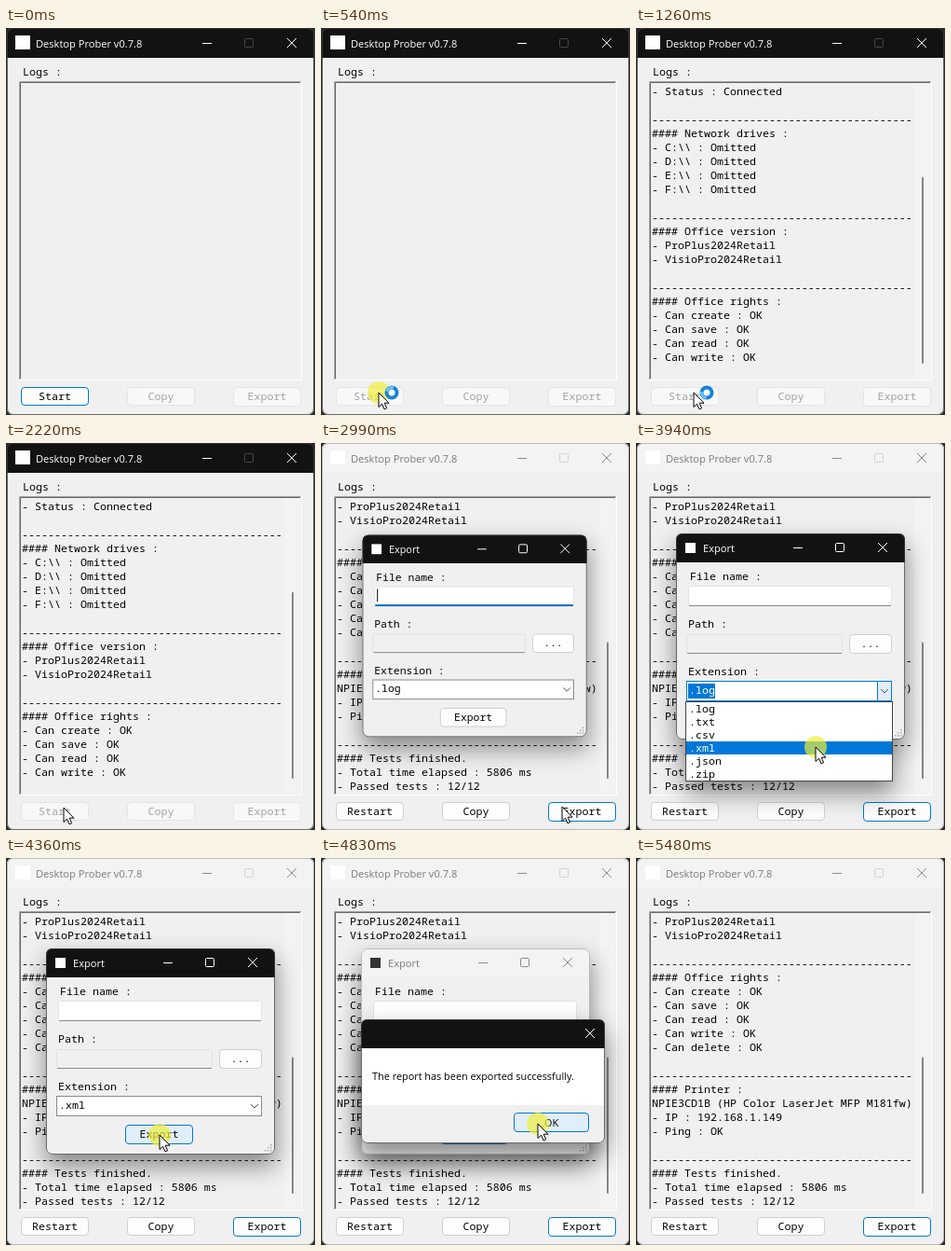
Animation, 332 px wide and 415 px high, one loop 5530 ms. Source, as an HTML page:

```html
<!DOCTYPE html>
<html lang="en">
<head>
<meta charset="utf-8">
<title>Log window</title>
<style>
html, body { margin: 0; width: 100%; height: 100%; overflow: hidden; background: #2a2a2a; }
svg { display: block; }
text { white-space: pre; }
.mono { font: 11.667px "Noto Sans Mono", "DejaVu Sans Mono", monospace; fill: #000; }
.ui { font: 11.1px "Open Sans", "Noto Sans", sans-serif; }
.note { font-size: 10.9px; font-weight: 500; }
.mid { text-anchor: middle; }
.win .bar { fill: #121212; }
.win .cap { fill: #fff; }
.win .ico { stroke: #fff; fill: none; }
.win .dim { stroke: #484848; fill: none; }
.win .mark { fill: #fff; }
.win .edge { fill: none; stroke: #3c3c3c; stroke-opacity: .75; }
.idle .bar { fill: #f3f3f3; }
.idle .cap { fill: #7b7b7b; }
.idle .ico { stroke: #8a8a8a; }
.idle .dim { stroke: #d2d2d2; }
.idle .edge { stroke: #a8a8a8; }
#dlg.idle .mark { fill: #333; }
.btn rect { fill: #fdfdfd; stroke: #d0d0d0; }
.btn.off rect { fill: #f8f8f8; stroke: #e4e4e4; }
.btn.off text { fill: #a3a3a3; }
.btn.focus rect { stroke: #0078d4; }
.btn.hot rect { fill: #e0eef9; }
.pop { filter: drop-shadow(0 12px 13px rgba(0,0,0,.45)); }
</style>
</head>
<body>
<svg id="stage" width="332" height="415" viewBox="0 0 332 415"></svg>
<script>
const LOOP = 5530;
const DASH = "-".repeat(40);
const block = (title, ...items) => [DASH, "#### " + title, ...items, ""];
const LOG = [
  ...block("Tests started."),
  ...block("Internet :", "- Ping : OK"),
  ...block("VPN :", "- Status : Connected"),
  ...block("Network drives :", ...["C", "D", "E", "F"].map(d => `- ${d}:\\\\ : Omitted`)),
  ...block("Office version :", "- ProPlus2024Retail", "- VisioPro2024Retail"),
  ...block("Office rights :", ...["create", "save", "read", "write", "delete"].map(r => `- Can ${r} : OK`)),
  ...block("Printer :", "NPIE3CD1B (HP Color LaserJet MFP M181fw)", "- IP : 192.168.1.149", "- Ping : OK"),
  DASH, "#### Tests finished.", "- Total time elapsed : 5806 ms", "- Passed tests : 12/12"
];
const ROWS = 21;
const TYPES = [".log", ".txt", ".csv", ".xml", ".json", ".zip"];

// [time, lines written]
const PROGRESS = [[0, 0], [560, 3], [660, 6], [780, 10], [900, 17], [1020, 22], [1140, 25], [1220, 29],
  [2280, 30], [2340, 36], [2400, LOG.length]];
// [time, x, y]
const PATH = [[120, 150, 420], [440, 62, 391], [2440, 62, 391], [2740, 259, 390], [3080, 259, 390],
  [3420, 267, 266], [3560, 267, 266], [3860, 193, 326], [4020, 193, 326], [4260, 165, 297],
  [4480, 165, 297], [4740, 233, 285], [4960, 233, 285], [5300, 345, 330]];
const CLICKS = [[480, 560], [2800, 2900], [3460, 3540], [3880, 3990], [4300, 4400], [4790, 4890]];
const RUN = [520, 2400], BUSY = [540, 1800], DIALOG = [2900, 4990], LIST = [3500, 3990], ALERT = [4460, 4900];

const rect = (x, y, w, h, attrs = "") => `<rect x="${x}" y="${y}" width="${w}" height="${h}" ${attrs}/>`;
const text = (x, y, s, cls = "mono", attrs = "") => `<text x="${x}" y="${y}" class="${cls}" ${attrs}>${s}</text>`;
const path = (d, attrs = "") => `<path d="${d}" ${attrs}/>`;
const button = (id, x, y, w, h, label, base, cls = "mono") =>
  `<g id="${id}" class="btn">${rect(x + .5, y + .5, w - 1, h - 1, 'rx="3.5"')}${text(x + w / 2, base, label, cls + " mid")}</g>`;
const cross = (x, y) => path(`M${x} ${y}l10 10m0 -10l-10 10`, 'class="ico"');
const frame = (x, y, w, h, bar) => {
  const top = `M${x} ${y + bar}v${7 - bar}q0-7 7-7h${w - 14}q7 0 7 7v${bar - 7}z`;
  return rect(x, y, w, h, 'rx="7" fill="#f0f0f0"') + path(top, 'class="bar"') +
    rect(x + .5, y + .5, w - 1, h - 1, 'rx="6.5" class="edge"');
};
const field = (x, y, w, h, fill, id) =>
  rect(x + .5, y + .5, w - 1, h - 1, `rx="2" fill="${fill}" stroke="#e2e2e2"`) +
  rect(x + 1, y + h - 1, w - 2, 1, `id="${id}" fill="#8a8a8a"`);

const mainWindow = `<g id="main" class="win">
  ${frame(1, 0, 330, 415, 32)}
  ${rect(10, 8, 16, 15, 'class="mark"')}
  ${text(32, 21, "Desktop Prober v0.7.8", "ui cap")}
  ${path("M211 16.5h10", 'class="ico"')}${rect(256.5, 11.5, 9, 9, 'rx="1" class="dim"')}${cross(302, 11)}
  ${text(18, 51, "Logs :")}
  ${path("M14.5 377V57.5H317", 'fill="none" stroke="#a0a0a0"')}
  ${path("M15.5 376V58.5H316", 'fill="none" stroke="#696969"')}
  ${path("M14 377.5H317.5V57", 'fill="none" stroke="#fff"')}
  <svg x="16" y="59" width="300" height="317"><g id="log">${LOG.map((s, i) => text(1, 13 + i * 15, s)).join("")}</g></svg>
  <g id="scroll">${rect(299, 59, 17, 317, 'fill="#f3f3f3"')}${rect(307, 74, 2, 286, 'id="thumb" rx="1" fill="#868686"')}</g>
  ${button("start", 16, 385, 73, 20, "Start", 398.5)}
  ${button("copy", 130, 385, 73, 20, "Copy", 399)}
  ${button("export", 244, 385, 73, 21, "Export", 399)}
</g>`;

const grip = [[0, 0], [0, 1], [1, 1], [0, 2], [1, 2], [2, 2]]
  .map(([c, r]) => rect(284 - c * 3, 307 + r * 3, 1.5, 1.5, 'fill="#aaa"')).join("");

const dialog = `<g id="dlg" class="win pop">
  ${frame(43, 97, 246, 221, 31)}
  ${rect(53, 107, 11, 11, 'class="mark"')}
  ${text(72, 117, "Export", "ui cap")}
  ${path("M169 112.5h10", 'class="ico"')}${rect(214.5, 107.5, 9, 9, 'rx="1" class="ico"')}${cross(260, 107)}
  ${text(58, 147, "File name :")}
  ${field(56, 153, 219, 22, "#fff", "nameLine")}
  ${rect(59, 156, 1, 14, 'id="caret"')}
  ${text(56, 198, "Path :")}
  ${field(54, 205, 168, 21, "#f0f0f0", "pathLine")}
  ${button("browse", 229, 205, 46, 21, "...", 219)}
  ${text(56, 249, "Extension :")}
  ${rect(54.5, 255.5, 220, 21, 'id="combo" fill="#fff" stroke="#8a8a8a"')}
  ${rect(259.5, 255.5, 15, 21, 'id="drop" fill="#e0eef9" stroke="#0078d4"')}
  ${path("M263 264l4 4 4-4", 'fill="none" stroke="#555"')}
  ${rect(56, 258, 29, 16, 'id="sel" fill="#0078d7"')}
  ${text(57, 269, ".log", "mono", 'id="ext"')}
  ${button("save", 128, 286, 73, 21, "Export", 300)}
  ${grip}
  <g id="list">
    ${rect(53.5, 277.5, 222, 85, 'fill="#fff" stroke="#444"')}
    ${rect(54, 278, 221, 14, 'id="row" fill="#0078d7"')}
    ${TYPES.map((s, i) => text(57, 289 + i * 14, s, "mono item")).join("")}
  </g>
</g>`;

const alertBox = `<g id="alert" class="win pop">
  ${frame(43, 173, 262, 133, 31)}
  ${rect(44, 204, 260, 61, 'fill="#fff"')}
  ${cross(284, 183)}
  ${text(55, 238, "The report has been exported successfully.", "ui note")}
  ${button("ok", 207, 273, 81, 21, "OK", 288, "ui")}
</g>`;

const pointer = `<g id="pointer">
  <circle id="halo" r="12" fill="#f0ee3c" fill-opacity=".7"/>
  ${path("M0 0V15.5L3.6 12.2 6 17.8 8.6 16.7 6.2 11.2H11z", 'fill="#fff" stroke="#000" stroke-linejoin="round"')}
  <g id="ring" transform="translate(14 0)"><circle r="5.5" fill="#fff" stroke="#1583dc" stroke-width="4"/>
    <circle id="spin" r="5.5" fill="none" stroke="#6fc3f7" stroke-width="3" stroke-dasharray="9 25.6"/></g>
</g>`;

const backdrop = rect(0, 0, 332, 415, 'fill="#2a2a2a"');

document.getElementById("stage").innerHTML = backdrop + mainWindow + dialog + alertBox + pointer;

const $ = id => document.getElementById(id);
const within = (t, [a, b]) => t >= a && t < b;
const show = (id, on) => $(id).style.display = on ? "" : "none";
const put = (id, attrs) => Object.entries(attrs).forEach(([k, v]) => $(id).setAttribute(k, v));
const toggle = (id, cls, on) => $(id).classList.toggle(cls, on);
const label = (id, s) => { const n = $(id).querySelector("text"); if (n.textContent !== s) n.textContent = s; };
const clamp = v => Math.max(0, Math.min(1, v));
const lines = [...$("log").children], items = [...document.querySelectorAll(".item")];

function pointerAt(t) {
  let i = PATH.findIndex(k => k[0] > t);
  if (i < 1) i = i ? PATH.length - 1 : 1;
  const [a, b] = [PATH[i - 1], PATH[i]];
  const p = clamp((t - a[0]) / (b[0] - a[0])), e = p * p * (3 - 2 * p);
  return [a[1] + (b[1] - a[1]) * e, a[2] + (b[2] - a[2]) * e];
}

// Windows grow in on opening and fade out on closing.
function popup(id, t, [from, to], cx, cy) {
  const p = clamp((t - from) / 216), out = clamp((t - to) / 100);
  const s = (.9 + .1 * (1 - (1 - p) ** 3)) * (1 - .08 * out);
  show(id, t >= from && out < 1);
  put(id, {
    transform: `translate(${cx} ${cy}) scale(${s}) translate(${-cx} ${-cy})`,
    opacity: Math.min(1, p * 3) * (1 - out)
  });
}

function drawLog(t) {
  const n = PROGRESS.filter(k => k[0] <= t).pop()[1];
  const total = Math.min(n + 1, LOG.length), top = Math.max(0, total - ROWS);
  lines.forEach((el, i) => el.style.display = i < n ? "" : "none");
  put("log", { transform: `translate(0 ${-15 * top})` });
  show("scroll", top > 0);
  const len = 286 * ROWS / Math.max(total, ROWS);
  put("thumb", { y: 360 - len, height: len });
}

function drawButtons(t, x, y) {
  const running = within(t, RUN), done = t >= RUN[1];
  label("start", done ? "Restart" : "Start");
  toggle("start", "off", running);
  toggle("start", "focus", t < RUN[0]);
  toggle("copy", "off", !done);
  toggle("export", "off", !done);
  toggle("export", "focus", t >= 2700);
  toggle("export", "hot", done && t < DIALOG[0] && x > 244 && y > 384);
  toggle("save", "focus", t >= 4300);
  toggle("save", "hot", within(t, [4220, 4460]));
  toggle("ok", "focus", true);
  toggle("ok", "hot", x > 207 && y < 295);
}

function drawDialog(t, y) {
  const open = within(t, LIST), typing = t < 3460, picked = t >= LIST[1];
  popup("dlg", t, DIALOG, 120, 180);
  toggle("dlg", "idle", within(t, ALERT));
  put("nameLine", { fill: typing ? "#0067c0" : "#8a8a8a", y: typing ? 173 : 174, height: typing ? 2 : 1 });
  show("caret", typing && (t - DIALOG[0]) % 1000 < 500);
  const marked = open || (picked && t < 4300);
  show("drop", open);
  show("sel", marked);
  put("combo", { stroke: open ? "#0078d4" : "#8a8a8a" });
  $("ext").textContent = picked ? ".xml" : ".log";
  $("ext").style.fill = marked ? "#fff" : "#000";
  show("list", open);
  const row = Math.max(0, Math.min(TYPES.length - 1, Math.floor((y - 278) / 14)));
  put("row", { y: 278 + row * 14 });
  items.forEach((el, i) => el.style.fill = i === row ? "#fff" : "#000");
}

function render(t) {
  const [x, y] = pointerAt(t);
  toggle("main", "idle", t >= DIALOG[0]);
  drawLog(t);
  drawButtons(t, x, y);
  drawDialog(t, y);
  popup("alert", t, ALERT, 174, 239.5);
  show("pointer", t >= PATH[0][0] && t < PATH[PATH.length - 1][0]);
  put("pointer", { transform: `translate(${x} ${y})` });
  show("halo", CLICKS.some(c => within(t, c)));
  show("ring", within(t, BUSY));
  put("spin", { transform: `rotate(${t * .36})` });
}

const begin = performance.now();
function tick() {
  render((performance.now() - begin) % LOOP);
  requestAnimationFrame(tick);
}
tick();
</script>
</body>
</html>
```
